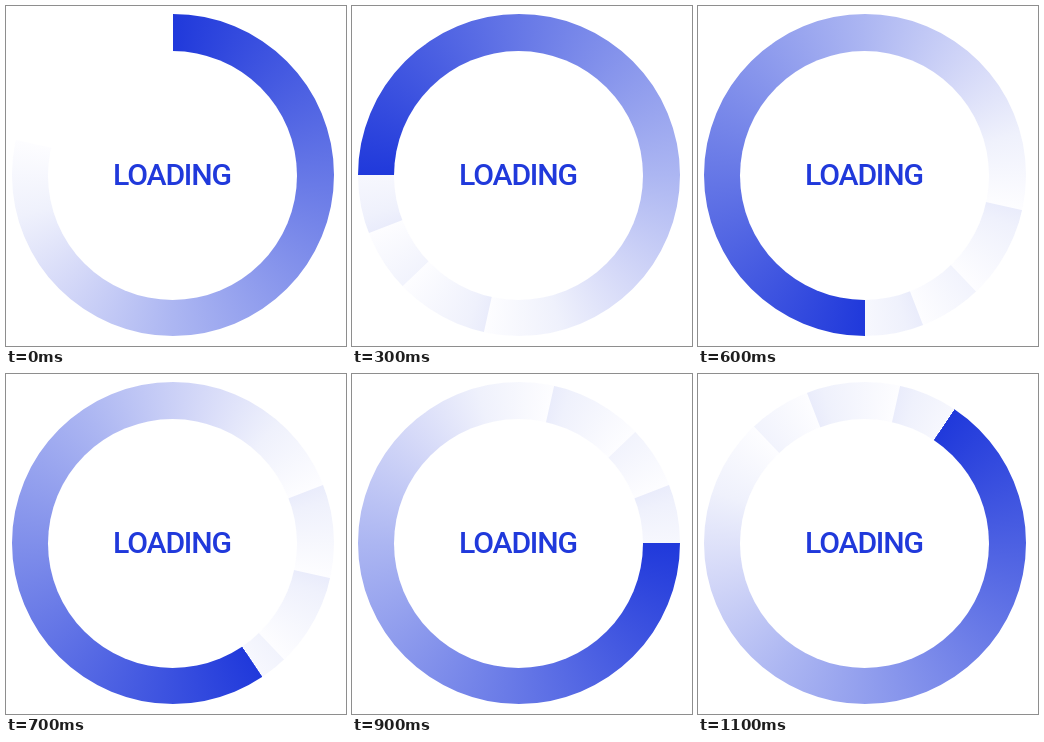
Animation of 340 by 340 pixels, one loop 1200 ms. Source, as an HTML page with a canvas:

```html
<!DOCTYPE html>
<html lang="en">
<head>
<meta charset="utf-8">
<title>Loading</title>
<style>
  html, body { margin: 0; width: 100%; height: 100%; overflow: hidden; background: #fff; }
  canvas, svg { position: absolute; left: 0; top: 0; }
  text {
    fill: #2039db; text-anchor: middle;
    font-weight: 500; font-stretch: 62.5%;
    letter-spacing: -0.04em;
  }
</style>
</head>
<body>
<canvas id="stage" width="340" height="340"></canvas>
<svg width="340" height="340"><text id="label">LOADING</text></svg>
<script>
const ctx = document.getElementById('stage').getContext('2d');
const label = document.getElementById('label');
const SIZE = 340, LOOP = 1200, STEPS = 12, NOTCHES = 32;
const TAU = Math.PI * 2, rad = deg => deg * Math.PI / 180;
const CX = 167, CY = 169, OUTER = 161, INNER = 124.5;
const SWEEP = 282.6;
// Degrees behind the head, strength of the blue.
const FADE = [[0, 1], [180, 0.37], [225, 0.19], [255, 0.07], [SWEEP, 0.01]];
const LABEL_WIDTH = 119, CAP = 0.712;

const tint = a => `rgb(${[32, 57, 219].map(c => Math.round(255 + (c - 255) * a))})`;

// Sets the label in the narrowest face, at the size that fills its width.
function setLabel() {
  const widthOf = (name, axis) => {
    label.style.font = `500 100px "${name}", sans-serif`;
    label.style.fontStretch = axis + '%';
    label.style.fontVariationSettings = `"wdth" ${axis}`;
    return label.getComputedTextLength() + 4;
  };
  const faces = [['Roboto', 75], ['Open Sans', 75], ['Noto Sans', 62.5]]
    .map(([name, axis]) => ({ name, axis, width: widthOf(name, axis) }))
    .sort((a, b) => a.width - b.width);
  const px = Math.min(45, 100 * LABEL_WIDTH / faces[0].width);
  widthOf(faces[0].name, faces[0].axis);
  label.style.fontSize = px + 'px';
  label.setAttribute('x', 166.5 - 0.02 * px);
  label.setAttribute('y', 168 + CAP * px / 2);
}

// The head turns counterclockwise, snapped to 1/32 of a turn.
const headAt = step => -Math.round(step * NOTCHES / STEPS) * 360 / NOTCHES - 90;

function sector(head) {
  const start = rad(head);
  const fill = ctx.createConicGradient(start, CX, CY);
  for (const [deg, a] of FADE) fill.addColorStop(deg / 360, tint(a));
  ctx.fillStyle = fill;
  ctx.beginPath();
  ctx.moveTo(CX, CY);
  ctx.arc(CX, CY, OUTER + 4, start, start + rad(SWEEP));
  ctx.closePath();
  ctx.fill();
}

function maskRing() {
  ctx.fillStyle = '#fff';
  ctx.beginPath();
  ctx.rect(0, 0, SIZE, SIZE);
  ctx.arc(CX, CY, OUTER, 0, TAU);
  ctx.fill('evenodd');
  ctx.beginPath();
  ctx.arc(CX - 0.5, CY + 0.5, INNER, 0, TAU);
  ctx.fill();
}

function draw(time) {
  const step = Math.floor((time % LOOP) / LOOP * STEPS);
  ctx.fillStyle = '#fff';
  ctx.fillRect(0, 0, SIZE, SIZE);
  // Earlier sectors stay below and show past the tail.
  for (let i = 0; i <= step; i++) sector(headAt(i));
  maskRing();
}

const begin = performance.now();
function tick() {
  draw(performance.now() - begin);
  requestAnimationFrame(tick);
}
setLabel();
tick();
</script>
</body>
</html>
```
